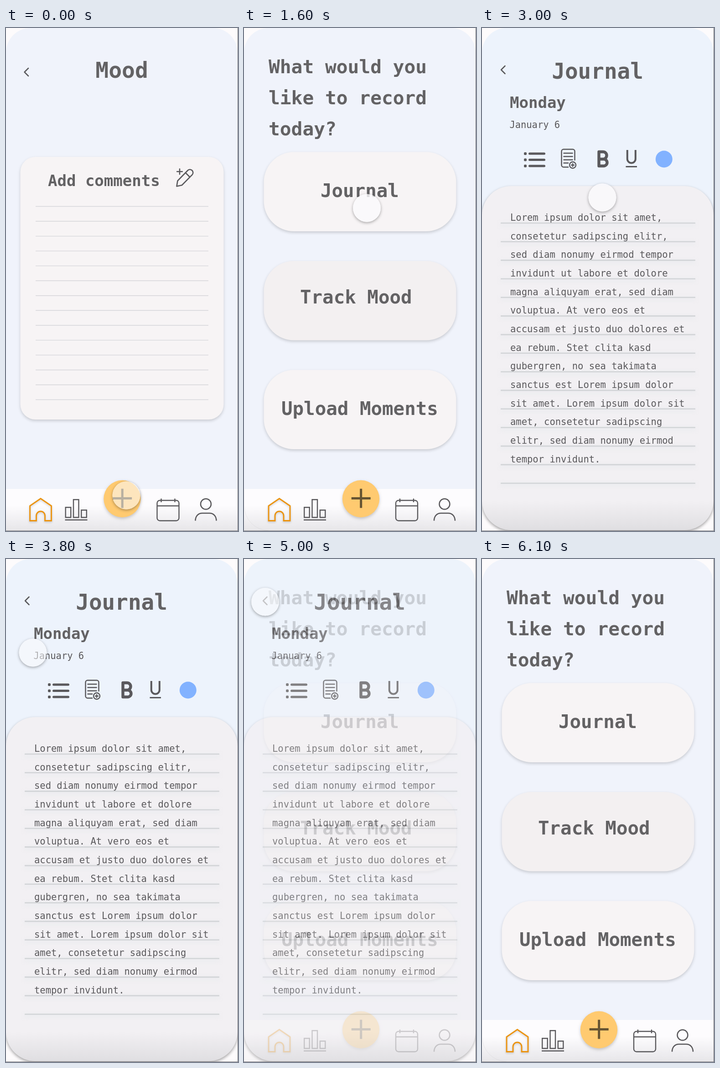
Recreate the animation shown at these times as an HTML page with a canvas. Size 509 by 1101 pixels, loop 6700 ms.

```html
<!DOCTYPE html>
<html lang="en">
<head>
<meta charset="utf-8">
<title>Mood journal</title>
<style>
html, body { margin: 0; width: 100%; height: 100%; overflow: hidden; background: #fdfbfc; }
canvas { display: block; width: 509px; height: 1101px; }
</style>
</head>
<body>
<canvas id="stage"></canvas>
<script>
const W = 509, H = 1101, LOOP = 6700, STEP = 100, DISSOLVE = 400;
const INK = '#5a595c', TITLE = '#636264', PAPER = '#fdfbfc';
const dpr = window.devicePixelRatio || 1;

function setup(canvas) {
  canvas.width = Math.round(W * dpr);
  canvas.height = Math.round(H * dpr);
  const ctx = canvas.getContext('2d');
  ctx.scale(dpr, dpr);
  return ctx;
}

function screen(paint) {
  const canvas = document.createElement('canvas');
  paint(setup(canvas));
  return canvas;
}

function repeat(n, fn) {
  for (let i = 0; i < n; i++) fn(i);
}

// Runs paint with a soft drop shadow.
function shaded(c, color, blur, dy, paint) {
  c.save();
  c.shadowColor = color;
  c.shadowBlur = blur * dpr;
  c.shadowOffsetY = dy * dpr;
  paint();
  c.restore();
}

function box(c, x, y, w, h, r, fill) {
  c.beginPath();
  c.roundRect(x, y, w, h, r);
  c.fillStyle = fill;
  c.fill();
}

function disc(c, x, y, r, fill) {
  c.beginPath();
  c.arc(x, y, r, 0, Math.PI * 2);
  c.fillStyle = fill;
  c.fill();
}

function stroke(c, shape, width, color = INK, cap = 'butt') {
  c.lineWidth = width;
  c.strokeStyle = color;
  c.lineCap = cap;
  c.lineJoin = cap === 'round' ? 'round' : 'miter';
  c.stroke(typeof shape === 'string' ? new Path2D(shape) : shape);
}

function outline(c, x, y, w, h, r, width) {
  const p = new Path2D();
  p.roundRect(x, y, w, h, r);
  stroke(c, p, width);
}

function circle(c, x, y, r, width) {
  outline(c, x - r, y - r, r * 2, r * 2, r, width);
}

function plus(c, x, y, r, width, color, cap) {
  stroke(c, `M${x - r} ${y}h${r * 2}M${x} ${y - r}v${r * 2}`, width, color, cap);
}

function backArrow(c, x, y) {
  stroke(c, `M${x + 8.5} ${y - 8.5}l-8.5 8.5l8.5 8.5`, 2.5, INK, 'round');
}

function text(c, str, x, y, size, weight = 'bold', color = TITLE) {
  c.font = `${weight} ${size}px "DejaVu Sans Mono", monospace`;
  c.fillStyle = color;
  c.fillText(str, x, y);
}

function fade(c, y0, y1, from, to) {
  const g = c.createLinearGradient(0, y0, 0, y1);
  g.addColorStop(0, from);
  g.addColorStop(1, to);
  return g;
}

function page(c, color) {
  c.fillStyle = PAPER;
  c.fillRect(0, 0, W, H);
  box(c, 0, 0, 508, H, [54, 54, 0, 0], color);
}

function frameEdge(c) {
  c.fillStyle = '#77767a';
  c.fillRect(508, 0, 1, H);
  c.fillRect(0, 1100, W, 1);
}

function card(c, x, y, w, h, r, fill, depth = .17) {
  shaded(c, `rgba(0,0,0,${depth})`, 6, 3, () => box(c, x, y, w, h, r, fill));
}

function navBar(c, dx) {
  c.fillStyle = fade(c, 1045, 1100, '#fdfcfe', '#e7e6e9');
  c.fillRect(0, 1009, 508, 92);
  c.save();
  c.translate(dx, 0);

  shaded(c, 'rgba(0,0,0,.2)', 4, 2, () =>
    stroke(c, 'M54 1078.5V1046L77.5 1030L101 1046V1078.5H87V1067.5a9.5 9.5 0 0 0-19 0V1078.5Z', 2.8, '#ec930e'));

  [22, 39, 16].forEach((h, i) => outline(c, 132.2 + i * 17.3, 1071.2 - h, 11.5, h, 0, 2.4));
  stroke(c, 'M131 1076.8h49', 2.4);

  shaded(c, 'rgba(0,0,0,.2)', 6, 3, () => disc(c, 256.5, 1030.5, 40.7, '#ffca70'));
  plus(c, 256.7, 1029.5, 21, 5, '#665432');

  outline(c, 333, 1034, 48, 44.5, 6, 2.4);
  stroke(c, 'M333 1046h48M342 1030v8M372 1030v8', 2.4);

  circle(c, 440, 1042, 11.5, 2.5);
  stroke(c, 'M417 1078.5C417 1069 423 1062 432 1062H448C457 1062 463 1069 463 1078.5', 2.5);
  c.restore();
}

function paintMood(c) {
  page(c, '#f0f3fb');
  backArrow(c, 40.5, 96.5);
  text(c, 'Mood', 196.3, 109, 48);
  card(c, 31.5, 282, 446, 575, 33, '#f7f4f5');
  text(c, 'Add comments', 92, 346, 34);
  stroke(c, 'M374.5 346.5l2-12L399 311.5a6.8 6.8 0 0 1 9.6 9.6L386 344zM394 317l9.5 9.5', 2.6, INK, 'round');
  plus(c, 381, 314.3, 5.8, 2.6, INK, 'round');
  repeat(14, i => stroke(c, `M65 ${390.5 + i * 32.54}H444`, 1.4, '#d6d6da'));
  navBar(c, -1.5);
  frameEdge(c);
}

function paintMenu(c) {
  page(c, '#f0f3fb');
  ['What would you', 'like to record', 'today?'].forEach((s, i) => text(c, s, 54, 99 + i * 68, 41.2));
  ['#f7f4f5', '#f3f0f1', '#f7f4f5'].forEach((fill, i) => card(c, 43.5, 271.5 + i * 238.5, 422, 173.5, 66, fill));
  text(c, 'Journal', 168, 370, 40.8);
  text(c, 'Track Mood', 123, 603, 40.8);
  text(c, 'Upload Moments', 82, 847, 40.8);
  navBar(c, 0);
  stroke(c, 'M.5 1009V1046A54 54 0 0 0 54 1100', 1, 'rgba(0,0,0,.05)');
  frameEdge(c);
}

const LOREM = `Lorem ipsum dolor sit amet,
consetetur sadipscing elitr,
sed diam nonumy eirmod tempor
invidunt ut labore et dolore
magna aliquyam erat, sed diam
voluptua. At vero eos et
accusam et justo duo dolores et
ea rebum. Stet clita kasd
gubergren, no sea takimata
sanctus est Lorem ipsum dolor
sit amet. Lorem ipsum dolor sit
amet, consetetur sadipscing
elitr, sed diam nonumy eirmod
tempor invidunt.`.split('\n');

function paintToolbar(c) {
  repeat(3, i => {
    const y = 275 + i * 13.5;
    box(c, 92, y - 3, 6, 6, 2, INK);
    stroke(c, `M104.5 ${y}H136.5`, 5, INK, 'round');
  });

  stroke(c, 'M190 304.5H179a4.5 4.5 0 0 1-4.5-4.5V270a4.5 4.5 0 0 1 4.5-4.5H199a4.5 4.5 0 0 1 4.5 4.5V290', 2.5);
  repeat(4, i => stroke(c, `M179.5 ${274 + i * 7.2}h${i < 3 ? 19 : 9.5}`, 2.5, INK, 'round'));
  circle(c, 199, 300, 7, 2.4);
  plus(c, 199, 300, 4, 2.4);

  stroke(c, 'M256.5 271h9a8 8 0 0 1 0 16h-9zM256.5 287h10.5a7.5 7.5 0 0 1 0 15h-10.5z', 6.4, INK, 'round');
  stroke(c, 'M318.8 267v19.5a9 9 0 0 0 18 0v-19.5', 4);
  stroke(c, 'M315.5 303.5h24.5', 3);
  disc(c, 399.3, 287, 18.5, '#82b2ff');
}

function paintJournal(c) {
  page(c, '#edf3fc');
  c.fillStyle = PAPER;
  c.fillRect(0, 1030, W, 71);
  backArrow(c, 42, 91.5);
  text(c, 'Journal', 153.3, 111, 47.6);
  text(c, 'Monday', 61, 175, 34);
  text(c, 'January 6', 60.5, 219, 20.4, 'normal', INK);
  paintToolbar(c);
  card(c, 0, 346, 508, 753, 64, fade(c, 1035, 1101, '#f2f0f3', '#dfdee1'), .35);
  const pitch = 40.68;
  repeat(15, i => shaded(c, 'rgba(212,226,230,.5)', 9, 3, () =>
    stroke(c, `M41 ${427 + i * pitch}H468`, 2.6, '#d2d4d7')));
  LOREM.forEach((s, i) => text(c, s, 62, 422 + i * pitch, 20.5, 'normal', INK));
  frameEdge(c);
}

const mood = screen(paintMood), menu = screen(paintMenu), journal = screen(paintJournal);
const changes = [[0, menu], [1900, journal], [4900, menu]];

// Pointer stops: time, x, y; eased in between.
const stops = [
  [700, 264, 1023], [1200, 256, 484], [1600, 269.5, 394], [1900, 264, 371], [3000, 264, 371],
  [3600, 74, 331], [3800, 59, 205], [3950, 59, 205], [4600, 46, 94], [4950, 46, 94],
  [5300, 56.5, 90], [5700, 142, -45]
];

function pointerAt(t) {
  const i = stops.findIndex(s => s[0] > t);
  if (i === 0) return stops[0].slice(1);
  if (i < 0) return stops[stops.length - 1].slice(1);
  const a = stops[i - 1], b = stops[i];
  const p = (t - a[0]) / (b[0] - a[0]), ease = p * p * (3 - 2 * p);
  return [1, 2].map(n => a[n] + (b[n] - a[n]) * ease);
}

function drawPointer(c, [x, y], alpha) {
  const r = 30.5;
  c.save();
  c.beginPath();
  c.rect(x - 60, y - 60, 120, 120);
  c.arc(x, y, r, 0, Math.PI * 2);
  c.clip('evenodd');
  shaded(c, 'rgba(0,0,0,.34)', 6, 2, () => disc(c, x, y, r, '#fff'));
  c.restore();
  disc(c, x, y, r, `rgba(252,251,253,${alpha})`);
}

const ctx = setup(document.getElementById('stage'));

function draw(t) {
  ctx.globalAlpha = 1;
  ctx.drawImage(mood, 0, 0, W, H);
  for (const [start, next] of changes) {
    if (t <= start) continue;
    ctx.globalAlpha = Math.min(1, (t - start) / DISSOLVE);
    ctx.drawImage(next, 0, 0, W, H);
  }
  ctx.globalAlpha = 1;
  drawPointer(ctx, pointerAt(t), t > 700 && t < 3100 ? .8 : .55);
}

const begin = performance.now();
function tick() {
  const t = (performance.now() - begin) % LOOP;
  draw(Math.floor(t / STEP) * STEP);
  requestAnimationFrame(tick);
}
tick();
</script>
</body>
</html>
```
